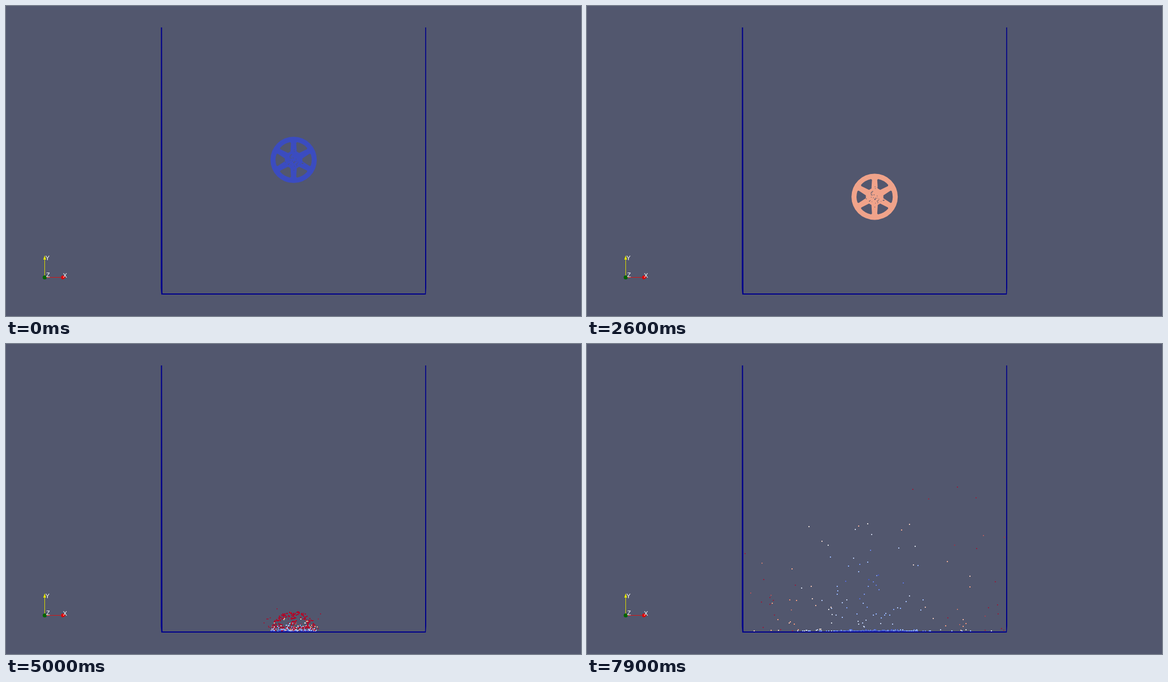
Animation, 1018 px wide and 550 px high, one loop 8 s. Source, as an HTML page with a canvas:

```html
<!DOCTYPE html>
<html>
<head>
<meta charset="utf-8">
<title>Wheel impact</title>
<style>
  html, body { margin: 0; width: 100%; height: 100%; overflow: hidden; background: #52576e; }
  canvas { display: block; }
</style>
</head>
<body>
<canvas id="stage" width="1018" height="550"></canvas>
<script>
const ctx = document.getElementById('stage').getContext('2d');
const LOOP = 8000, STEP = 100;
const BACKGROUND = '#52576e';
const HALF_G = 9.68;              // px per s², half the gravity
const CENTER = { x: 509.2, y: 273 };
const RIM = 41, INNER = 32, HUB = 15.5;
const FLOOR = 509, LEFT = 278, RIGHT = 741;
const IMPACT = 4.55;
const TOP_SPEED = 71;
const COUNT = 560;

let seed = 20;
function random() {
  seed = (seed + 0x6d2b79f5) | 0;
  let n = Math.imul(seed ^ (seed >>> 15), 1 | seed);
  n = (n + Math.imul(n ^ (n >>> 7), 61 | n)) ^ n;
  return ((n ^ (n >>> 14)) >>> 0) / 4294967296;
}

// Cool-to-warm colour scale for speed.
const SCALE = [[59, 76, 192], [141, 176, 254], [221, 221, 221], [244, 152, 122], [180, 4, 38]];
function speedColor(speed) {
  const pos = Math.min(speed / TOP_SPEED, 0.9999) * 4;
  const i = Math.floor(pos);
  const mix = SCALE[i].map((c, k) => Math.round(c + (SCALE[i + 1][k] - c) * (pos - i)));
  return `rgb(${mix})`;
}

const SECTOR = Math.PI / 3;
const HOLE_ANGLE = 21 * Math.PI / 180;

function wheelPath() {
  const path = new Path2D();
  path.arc(0, 0, RIM, 0, 2 * Math.PI);
  for (let i = 0; i < 6; i++) {
    const a = i * SECTOR, cos = Math.cos(a), sin = Math.sin(a);
    const at = (x, y) => [x * cos - y * sin, x * sin + y * cos];
    path.moveTo(...at(HUB, -2.5));
    path.lineTo(...at(28.3, -11));
    path.arc(0, 0, INNER, a - HOLE_ANGLE + 0.04, a + HOLE_ANGLE - 0.04);
    path.lineTo(...at(28.3, 11));
    path.lineTo(...at(HUB, 2.5));
    path.closePath();
  }
  return path;
}

function insideWheel(x, y) {
  const r = Math.hypot(x, y), angle = Math.atan2(y, x);
  if (r > RIM) return false;
  if (r > INNER) return true;
  const local = angle - Math.round(angle / SECTOR) * SECTOR;
  const along = r * Math.cos(local), across = Math.abs(r * Math.sin(local));
  return along < HUB || across > 2.5 + (along - HUB) * 0.625;
}

function makeParticle() {
  let x, y;
  do {
    x = (random() * 2 - 1) * RIM;
    y = (random() * 2 - 1) * RIM;
  } while (!insideWheel(x, y));
  const speed = Math.min(-Math.log(1 - random()) * 31, 135);
  const angle = random() * Math.PI;
  const startY = CENTER.y + y;
  return {
    x: CENTER.x + x, y: startY,
    vx: Math.cos(angle) * speed, vy: Math.sin(angle) * speed * 0.92,
    hit: Math.sqrt((FLOOR - startY) / HALF_G)
  };
}

const wheel = wheelPath();
const particles = Array.from({ length: COUNT }, makeParticle);
const pits = Array.from({ length: 34 }, () => {
  const r = 2 + random() * 17, a = random() * 2 * Math.PI;
  return [r * Math.cos(a), r * Math.sin(a), 0.8 + random() * 0.8];
});

function reflect(x) {
  const width = RIGHT - LEFT;
  const u = (((x - LEFT) % (2 * width)) + 2 * width) % (2 * width);
  return LEFT + (u > width ? 2 * width - u : u);
}

function particleState(p, t) {
  if (t < p.hit) return { x: p.x, y: p.y + HALF_G * t * t, speed: 2 * HALF_G * t };
  let left = t - p.hit, { x, vx, vy } = p;
  for (let bounce = 0; bounce < 4; bounce++) {
    const flight = vy / HALF_G;
    if (left < flight) {
      return {
        x: reflect(x + vx * left),
        y: FLOOR - vy * left + HALF_G * left * left,
        speed: Math.hypot(vx, vy - 2 * HALF_G * left)
      };
    }
    left -= flight;
    x += vx * flight;
    vx *= 0.75;
    vy *= 0.35;
  }
  return { x: reflect(x + vx * left), y: FLOOR, speed: Math.abs(vx) };
}

function polygon(color, ...points) {
  ctx.fillStyle = color;
  ctx.beginPath();
  points.forEach(([x, y]) => ctx.lineTo(x, y));
  ctx.fill();
}

function disc(color, x, y, r) {
  ctx.fillStyle = color;
  ctx.beginPath();
  ctx.arc(x, y, r, 0, 2 * Math.PI);
  ctx.fill();
}

function drawBox() {
  const navy = '#00008b';
  polygon(navy, [274.3, 38], [276.3, 38], [277, 509], [278, 512], [275, 512], [274, 500]);
  polygon(navy, [742.2, 38], [743.8, 38], [744, 500], [743.2, 512], [741, 512], [742, 509]);
  polygon(navy, [275, 510], [743, 510], [743, 512], [275, 512]);
}

function drawAxes() {
  ctx.fillStyle = '#d01818';
  ctx.fillRect(69, 481, 30, 1);
  polygon('#e00000', [98, 479], [101, 478], [106, 481.5], [101, 485], [98, 484]);
  ctx.fillStyle = '#d8d800';
  ctx.fillRect(68, 449, 1, 32);
  polygon('#e6e600', [68.5, 442.5], [71, 450], [66, 450]);
  disc('#006400', 68.5, 481.5, 3.5);
  ctx.fillStyle = '#fff';
  ctx.font = '11px "Liberation Sans", Arial, sans-serif';
  ctx.fillText('Y', 69.7, 451);
  ctx.fillText('Z', 71, 481);
  ctx.fillText('X', 100.7, 482);
}

function drawWheel(t) {
  ctx.save();
  ctx.translate(CENTER.x, CENTER.y + HALF_G * t * t);
  ctx.fillStyle = speedColor(2 * HALF_G * t);
  ctx.fill(wheel, 'evenodd');
  ctx.fillStyle = BACKGROUND;
  pits.forEach(([x, y, size]) => ctx.fillRect(x, y, size, size));
  ctx.restore();
}

function drawParticles(t) {
  for (const p of particles) {
    const { x, y, speed } = particleState(p, t);
    const size = speed > 55 && t > p.hit ? 1.6 : 2;
    ctx.fillStyle = speedColor(speed);
    ctx.fillRect(Math.round(x - 1), Math.round(y - 1), size, size);
  }
}

function render(now) {
  const t = Math.floor((now % LOOP) / STEP) * STEP / 1000;
  ctx.fillStyle = BACKGROUND;
  ctx.fillRect(0, 0, 1018, 550);
  if (t < IMPACT) drawWheel(t);
  else drawParticles(t);
  drawBox();
  drawAxes();
}

const start = performance.now();
function frame() {
  render(performance.now() - start);
  requestAnimationFrame(frame);
}
frame();
</script>
</body>
</html>
```
